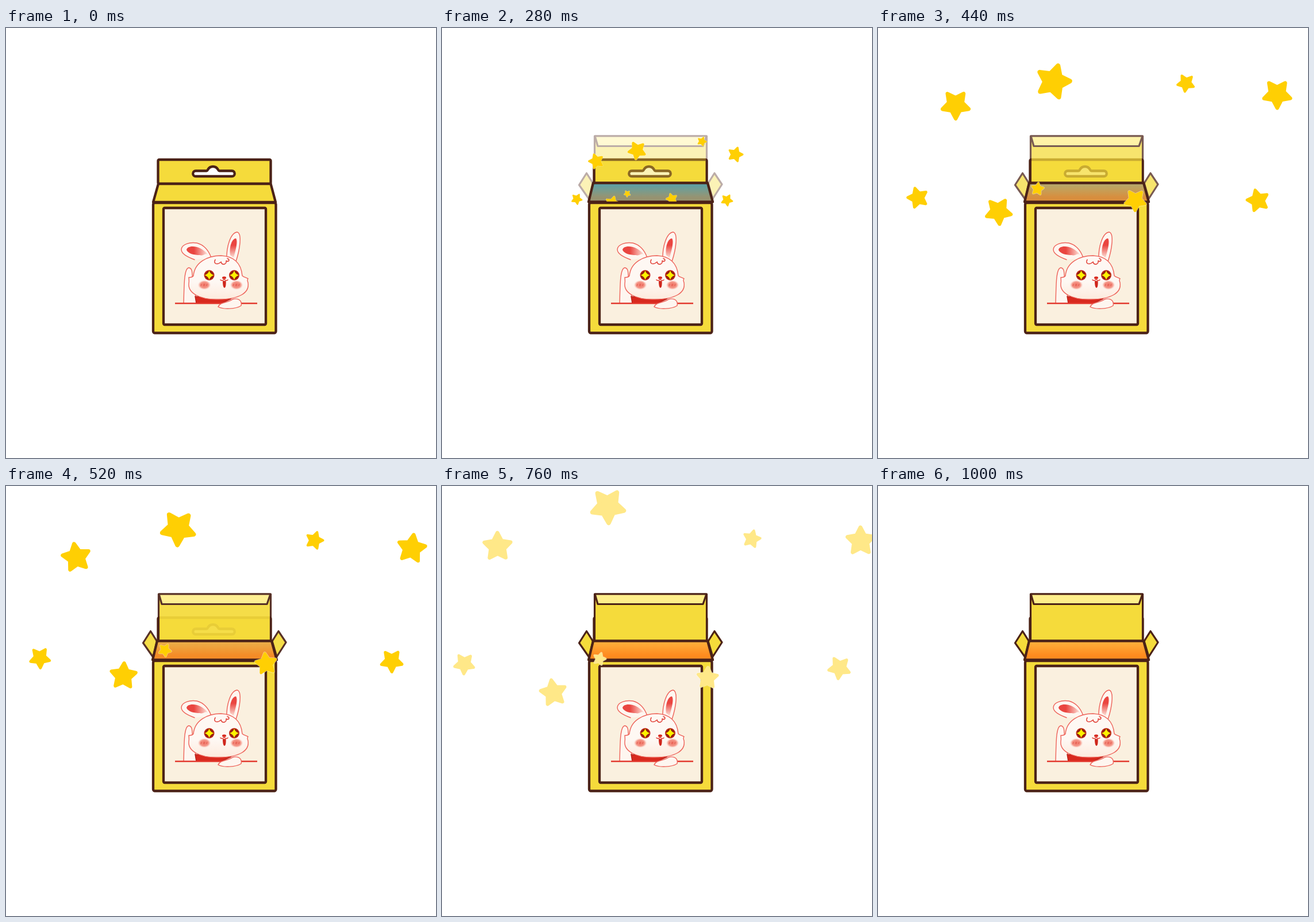
Animation, 748 px wide and 748 px high, one loop 1120 ms. Source, as an HTML page:

```html
<!DOCTYPE html>
<html lang="en">
<head>
<meta charset="utf-8">
<title>Bunny box</title>
<style>
  html, body { margin: 0; width: 100%; height: 100%; overflow: hidden; background: #fff; }
  svg { display: block; width: 100vw; height: 100vh; }
  .soft { filter: blur(.5px); }
  .ink { stroke: #4b2217; stroke-width: 4.3; stroke-linejoin: round; }
  .thin { stroke-width: 3.2; }
  .gold { fill: #f5db3b; }
  .fur { fill: #fef6f0; stroke: #ee635a; stroke-width: 1.4; stroke-linecap: round; }
  .red { fill: none; stroke: #e2433a; stroke-width: 1.6; stroke-linecap: round; }
</style>
</head>
<body>
<svg viewBox="0 0 748 748">
  <defs>
    <linearGradient id="blue" x2="0" y2="1">
      <stop stop-color="#1e99cd"/><stop offset="1" stop-color="#329bc0"/>
    </linearGradient>
    <linearGradient id="orange" x2="0" y2="1">
      <stop id="warmTop" offset=".1" stop-color="#ffae3a"/><stop id="warmBottom" offset=".75" stop-color="#ff8b1f"/>
    </linearGradient>
    <linearGradient id="earL">
      <stop offset=".35" stop-color="#ea4540"/><stop offset="1" stop-color="#fde3da"/>
    </linearGradient>
    <linearGradient id="earR" x2="0" y2="1">
      <stop offset=".35" stop-color="#ea4540"/><stop offset="1" stop-color="#fde3da"/>
    </linearGradient>
    <radialGradient id="blush">
      <stop stop-color="#ee6f60"/><stop offset=".65" stop-color="#f59a8c"/><stop offset="1" stop-color="#fbd3c8" stop-opacity="0"/>
    </radialGradient>
    <linearGradient id="face" x2="0" y2="1">
      <stop offset=".6" stop-color="#fef8f3"/><stop offset="1" stop-color="#fdeadd"/>
    </linearGradient>
    <g id="eye">
      <circle r="9" fill="#c3261b"/>
      <circle r="7.6" fill="#92230f"/>
      <path d="M0-8Q1.8-1.8 8 0Q1.8 1.8 0 8Q-1.8 1.8-8 0Q-1.8-1.8 0-8Z" fill="#fff200"/>
    </g>
    <g id="cheek">
      <ellipse rx="11.5" ry="8.5" fill="url(#blush)"/>
      <path d="M-5-2l-1 4M0-2l-1 4M5-2l-1 4" stroke="#e2574c" fill="none"/>
    </g>
    <path id="mouth" d="M263 269.500H462L471 302.500H255Z"/>
    <polygon id="star" stroke-width=".24" stroke-linejoin="round"/>
  </defs>

  <g id="scene">
    <g class="ink soft">
      <rect class="gold" x="264.500" y="229" width="196" height="42" rx="2"/>
      <path fill="#fff" d="M330 248.500H349C352 248 351 241 360 241S368 248 371 248.500H393A4.700 4.700 0 0 1 393 258H330A4.700 4.700 0 0 1 330 248.500Z"/>
      <path class="gold" d="M265 271H460.500L469 303H256Z"/>
    </g>

    <g id="opened" class="soft">
      <g id="lid" class="ink thin">
        <path class="gold" d="M265.500 188H460.500V270H265.500Z"/>
        <path fill="#ffee8a" d="M266 188H460L454 205.500H271Z"/>
        <path class="gold" d="M251.500 252.500L262.500 270L256 298L238.500 273Z"/>
        <path class="gold" d="M474 252.500L487 272L471 297L463 270Z"/>
      </g>
      <use href="#mouth" fill="url(#blue)"/>
      <use href="#mouth" fill="url(#orange)" class="ink"/>
    </g>

    <g id="front" class="soft">
      <g class="ink">
        <rect class="gold" x="256" y="304" width="213.500" height="226.500" rx="3"/>
        <rect fill="#faf0df" x="274" y="313" width="178" height="203" rx="2"/>
      </g>
      <g class="fur">
        <path d="M309 479C310 452 309 418 318 417C326 418 323 431 325 440L332 479Z"/>
        <path d="M328 403C315 398 305 393 305 385C306 376 320 372 332 374C344 377 353 387 357 400"/>
        <path fill="url(#earL)" stroke="none" d="M314 386C315 377 338 377 351 394C346 391 343 397 337 395C328 395 317 393 314 386Z"/>
        <path d="M384 403C383 380 391 356 402 355C411 357 407 385 400 406"/>
        <path fill="url(#earR)" stroke="none" d="M390 395C388 378 394 366 400 366C404 371 399 388 396 400Z"/>
        <path d="M330 479V466H400L409 479Z" stroke="none"/>
        <path d="M329 467L331 479H374L392 471Z" fill="#d8291e" stroke="#b71f17"/>
      </g>
      <path d="M294 479H437" stroke="#e2382e" stroke-width="2.400"/>
      <g class="fur">
        <path d="M369 485C372 476 388 478 394 472C404 469 411 474 409 483C400 489 378 490 369 485Z"/>
        <path fill="url(#face)" d="M326 431C328 408 350 396 374 396C396 397 409 409 411 431C414 434 418 434 421 436C419 438 420 440 421 443C424 461 405 472 370 472C337 473 316 461 318 444C319 440 318 437 318 434C321 434 324 434 326 431Z"/>
      </g>
      <path class="red" d="M364 403C360 410 367 413 374 407C376 414 384 411 383 405M383 405C389 408 389 402 385 401"/>
      <use href="#cheek" x="345" y="447"/>
      <use href="#cheek" x="401" y="447"/>
      <use href="#eye" x="353.500" y="430"/>
      <use href="#eye" x="397" y="430"/>
      <ellipse cx="379.500" cy="434.500" rx="3.500" ry="2.200" fill="#d8291e"/>
      <path class="red" d="M373 438Q376 441 379.500 437Q383 441 386 438"/>
      <path d="M377 440H382.500C383 447 382 452 380 452S377 447 377 440Z" fill="#cf261c"/>
    </g>
    <g id="stars"></g>
  </g>
</svg>

<script>
const LOOP = 1120, STEP = 40, LAUNCH = 120, SETTLE = 640;
const ORIGIN = { x: 365, y: 303 };

// reach: sideways travel, rise and fall: vertical travel, turn: degrees until settled,
// drift: share of the way covered slowly rather than in the burst
const STARS = [
  { size: 27.5, reach: -258, rise: 190, turn: 175, drift: 0.39 },
  { size: 33, reach: -72, rise: 252, turn: 144, drift: 0.6 },
  { size: 17, reach: 173, rise: 210, turn: -164, drift: 0.05 },
  { size: 27.5, reach: 354, rise: 202, turn: -176 },
  { size: 20, reach: -318, rise: 18, fall: 27, turn: -144 },
  { size: 25.5, reach: -167, rise: 8, fall: 70, turn: -183 },
  { size: 12, reach: -90, rise: 37, fall: 38, turn: 131, drift: 0.1 },
  { size: 20.5, reach: 93, rise: 28, fall: 65, turn: 178, drift: 0.4 },
  { size: 21.5, reach: 318, rise: 14, fall: 30, turn: -141 }
];

const $ = id => document.getElementById(id);
const span = (t, from, to) => Math.max(0, Math.min(1, (t - from) / (to - from)));
const easeOut = s => s * (2 - s);
const smooth = s => s * s * (3 - 2 * s);

function make(tag, attrs, parent) {
  const el = document.createElementNS('http://www.w3.org/2000/svg', tag);
  for (const k in attrs) el.setAttribute(k, attrs[k]);
  return parent.appendChild(el);
}

const starPoints = Array.from({ length: 10 }, (_, i) => {
  const r = i % 2 ? 0.45 : 0.87, a = i * Math.PI / 5;
  return (r * Math.sin(a)).toFixed(3) + ',' + (-r * Math.cos(a)).toFixed(3);
}).join(' ');
$('star').setAttribute('points', starPoints);

const sprites = STARS.map(({ size }) => {
  const el = make('g', {}, $('stars'));
  make('polygon', {
    points: starPoints, stroke: '#fff', 'stroke-opacity': 0.5,
    'stroke-width': 0.24 + 1.4 / size, 'stroke-linejoin': 'round'
  }, el);
  make('use', { href: '#star', fill: 'currentColor', stroke: 'currentColor' }, el);
  return el;
});

const slow = t => easeOut(span(t, LAUNCH, 960));

// Fraction of the way travelled: a burst followed by a slowing drift.
function travel(t, drift) {
  const burst = span(t, LAUNCH, 440) ** (0.9 + 1.5 * drift);
  return (1 - drift) * burst + drift * slow(t) / slow(SETTLE);
}

function pose({ size, reach, rise, fall = 0, turn, drift = 0.25 }, t) {
  const p = travel(t, drift);
  const x = ORIGIN.x + reach * p;
  const y = ORIGIN.y - rise * p + fall * smooth(span(t, 160, 880));
  const angle = turn * (t - LAUNCH) / (SETTLE - LAUNCH);
  const scale = size * span(t, 115, 435);
  return `translate(${x} ${y}) rotate(${angle}) scale(${scale})`;
}

function draw(t) {
  const open = t >= 160;
  $('opened').style.display = open ? '' : 'none';
  const lid = span(t, LAUNCH, 550);
  $('lid').style.opacity = lid;
  $('warmTop').style.stopOpacity = lid ** 1.3;
  $('warmBottom').style.stopOpacity = lid ** 0.7;

  const stars = $('stars');
  stars.style.display = open && t < 1000 ? '' : 'none';

  // Stars leave the box from behind its front panel.
  const next = t < 360 ? $('front') : null;
  if (stars.nextElementSibling !== next) $('scene').insertBefore(stars, next);

  // They pale to white but stay opaque.
  const pale = easeOut(span(t, 660, 980));
  stars.style.color = `rgb(255, ${207 + 48 * pale}, ${3 + 252 * pale})`;
  sprites.forEach((el, i) => el.setAttribute('transform', pose(STARS[i], t)));
}

const start = performance.now();
function frame() {
  let t = Math.floor((performance.now() - start) % LOOP / STEP) * STEP;
  if (t === 680 || t === 800) t -= STEP; // two poses are held twice as long
  draw(t);
  requestAnimationFrame(frame);
}
frame();
</script>
</body>
</html>
```
